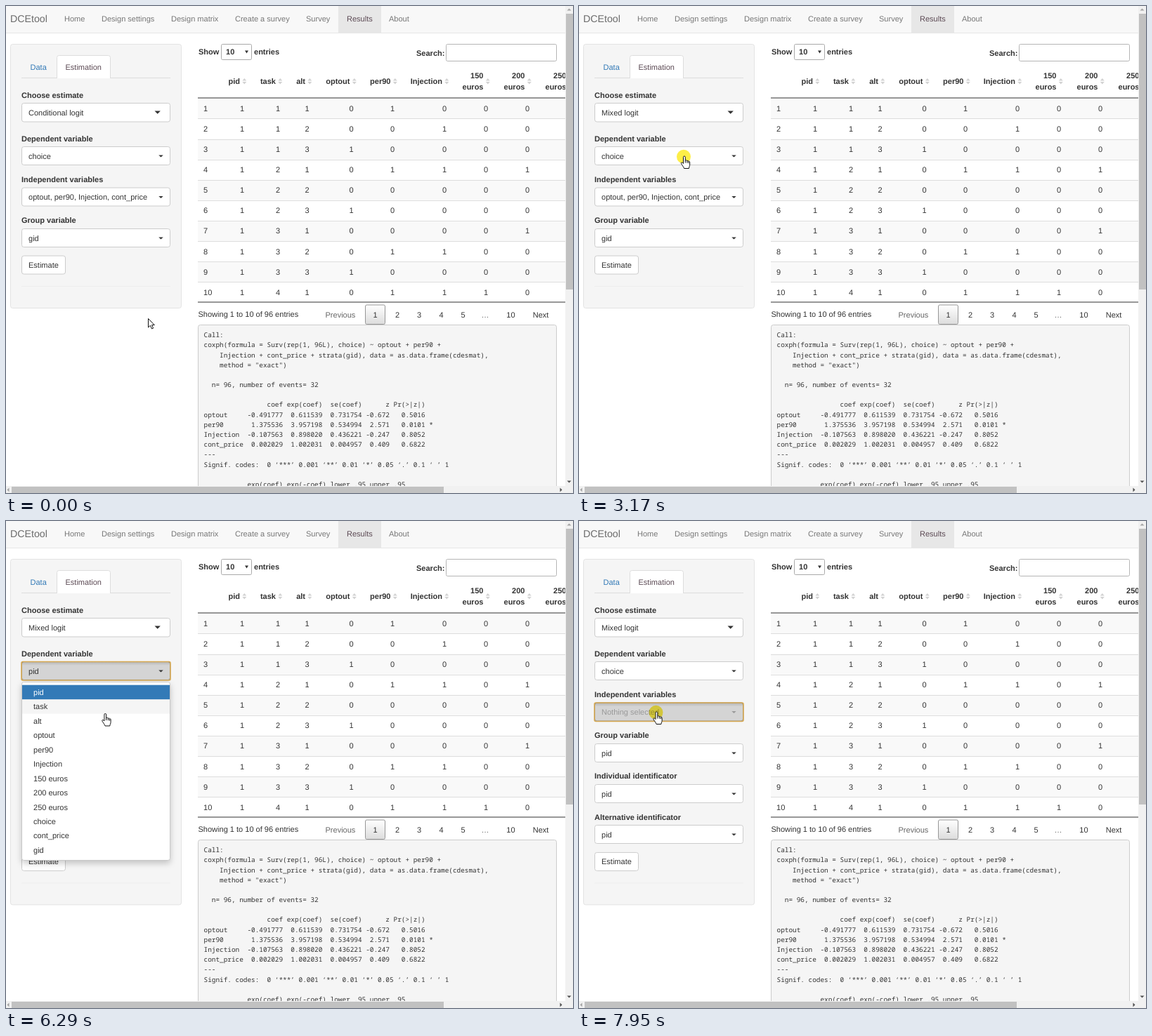
Recreate the animation shown at these times as an HTML page. Size 807 px wide and 694 px high, loop 8000 ms.

```html
<!DOCTYPE html>
<html lang="en">
<head>
<meta charset="utf-8">
<title>Results</title>
<style>
html, body { margin: 0; width: 100%; height: 100%; overflow: hidden; background: #fff; }
svg { display: block; position: absolute; left: 0; top: 0; }
text { font: 11.02px "Liberation Sans", Arial, sans-serif; fill: #333; white-space: pre; text-rendering: geometricPrecision; }
.b { font-weight: bold; }
.brand { font-size: 14.2px; fill: #6c6c6c; }
.nav { fill: #777; }
.on { fill: #5c4a54; }
.link { fill: #337ab7; }
.dim { fill: #999; }
.mid { fill: #666; }
.white { fill: #fff; }
.end { text-anchor: end; }
.num { text-anchor: middle; }
.mono { font: 9.38px "Noto Sans Mono", "DejaVu Sans Mono", monospace; }
.menu { filter: drop-shadow(0 4px 4px rgba(0,0,0,.2)); }
.glow { filter: drop-shadow(0 0 3px rgba(102,175,233,.6)); }
#spot { mix-blend-mode: multiply; }
</style>
</head>
<body>
<svg width="807" height="694" viewBox="0 0 807 694">
  <defs>
    <linearGradient id="page" x2="0" y2="1"><stop stop-color="#fff"/><stop offset="1" stop-color="#dcdcdc"/></linearGradient>
    <linearGradient id="inset" x2="0" y2="1"><stop stop-opacity=".14"/><stop offset="1" stop-opacity="0"/></linearGradient>
    <clipPath id="view"><rect width="796" height="684"/></clipPath>
  </defs>
  <g clip-path="url(#view)"><g id="main"></g><g id="side"></g></g>
  <g id="bars"></g>
  <circle id="spot" r="10" fill="#fdee48"/>
  <g id="pointer">
    <g stroke="#111" stroke-width="1" fill="#fff" stroke-linejoin="round">
      <path id="arrow" d="M.5 .5V13L3.4 10.3 5.5 15 7.6 14.1 5.5 9.6H9.3Z"/>
      <path id="hand" d="M-1.5 1.9a1.4 1.4 0 0 1 2.8 0V7C1.5 5.8 3.9 6 3.9 7.5 4.1 6.5 6 6.8 6 8.2 6.3 7.4 7.7 7.8 7.7 9V12.6C7.7 14.8 6.6 15.6 6.4 18H-.4C-.8 15.9-3.3 13.6-4.6 10.8-5.1 9.3-3.2 8.7-1.5 11ZM1.3 7V10M3.9 7.5V10.2M6 8.2V10.6"/>
      <path id="beam" fill="none" d="M-2.5-2.5H-.6L0-2 .6-2.5H2.5M0-2V9M-2.5 9.5H-.6L0 9 .6 9.5H2.5"/>
    </g>
  </g>
</svg>
<script>
const $ = id => document.getElementById(id);
const text = (x, y, s, cls = '') => `<text x="${x}" y="${y + 3.9}" class="${cls}">${s}</text>`;
const rect = (x, y, w, h, fill, more = '') => `<rect x="${x}" y="${y}" width="${w}" height="${h}" fill="${fill}" ${more}/>`;
const box = (x, y, w, h, fill, stroke, r = 3, more = '') =>
  rect(x + .5, y + .5, w - 1, h - 1, fill, `stroke="${stroke}" rx="${r}" ${more}`);
// Triangle centred on x, y; a negative h points upwards.
const tri = (x, y, w, h, fill = '#333') =>
  `<path fill="${fill}" d="M${x - w / 2} ${y - h / 2}h${w}l${-w / 2} ${h}z"/>`;
const sideTri = (x, y, w, h, fill) => `<path fill="${fill}" d="M${x - w / 2} ${y - h / 2}v${h}l${w} ${-h / 2}z"/>`;

const ROW = 29.1, ITEM = 20.45;
const heads = [['pid', 333], ['task', 384], ['alt', 426], ['optout', 489.5], ['per90', 547.5],
  ['Injection', 621], ['150 euros', 679.5], ['200 euros', 738.5], ['250 euros', 797.5]];
const digitX = [336, 387, 428.5, 491.5, 550, 624, 683, 742];
const rows = ['11101000', '11200100', '11310000', '12101101', '12200000',
  '12310000', '13100001', '13201100', '13310000', '14101110'];
const output = `Call:
coxph(formula = Surv(rep(1, 96L), choice) ~ optout + per90 +
    Injection + cont_price + strata(gid), data = as.data.frame(cdesmat),
    method = "exact")

  n= 96, number of events= 32

                coef exp(coef)  se(coef)      z Pr(>|z|)
optout     -0.491777  0.611539  0.731754 -0.672   0.5016
per90       1.375536  3.957198  0.534994  2.571   0.0101 *
Injection  -0.107563  0.898020  0.436221 -0.247   0.8052
cont_price  0.002029  1.002031  0.004957  0.409   0.6822
---
Signif. codes:  0 ‘***’ 0.001 ‘**’ 0.01 ‘*’ 0.05 ‘.’ 0.1 ‘ ’ 1

           exp(coef) exp(-coef) lower .95 upper .95`;

function navbar() {
  const items = [['Home', 83], ['Design settings', 136], ['Design matrix', 235], ['Create a survey', 326],
    ['Survey', 427], ['Results', 485], ['About', 545]];
  return rect(0, 0, 796, 38, '#f8f8f8') + rect(0, 38, 796, 1, '#e7e7e7') + rect(473, 0, 61, 38, '#e7e7e7') +
    text(6, 18.8, 'DCEtool', 'brand') +
    items.map(([s, x]) => text(x, 18, s, s === 'Results' ? 'on' : 'nav')).join('');
}

function table() {
  let s = text(274, 65, 'Show', 'b') + box(306, 54, 44, 23, '#fff', '#a9a9a9', 2) + text(313, 65.5, '10', 'b') +
    tri(342.5, 65.5, 5, 4) + text(353, 65, 'entries', 'b') +
    text(584, 67, 'Search:', 'b') + box(626, 54, 158, 25, '#fff', '#b5b5b5', 2);
  for (const [name, x] of heads) {
    const words = name.split(' ');
    words.forEach((w, i) => s += text(x, words.length > 1 ? 99.5 + i * 15.7 : 107, w, 'b end'));
    s += tri(x + 6.3, 104.8, 6, -3.6, '#d2d2d2') + tri(x + 6.3, 109.8, 6, 3.6, '#d2d2d2');
  }
  rows.forEach((r, i) => {
    const y = 131.3 + i * ROW, mid = y + 14.6;
    if (i % 2 === 0) s += rect(273, y, 523, ROW, '#f9f9f9');
    if (i) s += rect(273, Math.round(y), 523, 1, '#ddd');
    s += text(281, mid, i + 1);
    [...r].forEach((d, k) => s += text(digitX[k], mid, d, 'num'));
  });
  s += rect(273, 130.5, 523, 1, '#333') + rect(273, 421.5, 523, 1, '#333');
  s += text(273.5, 439.5, 'Showing 1 to 10 of 96 entries') + text(454.5, 440, 'Previous', 'mid') +
    box(511, 425.5, 29, 28.5, 'url(#page)', '#979797', 2);
  [['1', 525.5], ['2', 557], ['3', 588], ['4', 619.5], ['5', 650.5], ['…', 682], ['10', 718.5], ['Next', 761]]
    .forEach(([p, x]) => s += text(x, 440, p, p === '…' ? 'num mid' : 'num'));
  return s;
}

function consoleBox() {
  return box(273, 454, 511, 260, '#f5f5f5', '#ccc') +
    output.split('\n').map((l, i) => text(281.5, 468.4 + i * 14.17, l, 'mono')).join('');
}

function scrollbars() {
  return rect(796, 0, 11, 694, '#f1f1f1') + rect(0, 684, 807, 10, '#f1f1f1') +
    rect(797, 11, 10, 393, '#c1c1c1') + rect(8, 685, 615, 9, '#c1c1c1') +
    tri(801.5, 5, 6, -3, '#a3a3a3') + tri(801.5, 678, 6, 3, '#505050') +
    sideTri(3, 689.5, -3, 6, '#a3a3a3') + sideTri(790, 689.5, 3, 6, '#505050');
}

$('main').innerHTML = navbar() + table() + consoleBox();
$('bars').innerHTML = scrollbars();

const looks = {
  plain: ['#fff', '#ccc'],
  hover: ['#e6e6e6', '#adadad'],
  focus: ['#e6e6e6', '#8c8c8c'],
  press: ['#d4d4d4', '#8c8c8c'],
};
function button(y, label, look, empty) {
  const [fill, edge] = looks[look];
  let s = box(22, y, 212, 27, fill, edge);
  if (look === 'press') s += rect(23, y + 1, 210, 5, 'url(#inset)');
  if (look === 'press' || look === 'focus')
    s += rect(22, y + .5, 212, 26.5, 'none', 'rx="2" stroke="#d6a850" stroke-width="1.6"');
  return s + text(32, y + 14, label, empty ? 'dim' : '') + tri(220.5, y + 14, 6.4, 3.2, empty ? '#999' : '#333');
}

const estimates = ['FALSE', 'Conditional logit', 'Mixed logit', 'Willingness to pay', 'Figures'];
const columns = ['pid', 'task', 'alt', 'optout', 'per90', 'Injection', '150 euros', '200 euros', '250 euros',
  'choice', 'cont_price', 'gid'];
const rowAt = (y, top) => Math.floor((y - top) / ITEM);

function estimateMenu(y) {
  const at = y < 171.8 ? 1 : Math.min(rowAt(y, 171.8), 4);
  return box(22, 167, 212, 111, '#fff', '#d0d0d0', 2, 'class="menu"') +
    rect(23, 171.8 + at * ITEM, 210, ITEM, '#f5f5f5') +
    estimates.map((s, i) => text(32, 182 + i * ITEM, s)).join('');
}

function columnMenu(y) {
  const at = rowAt(y, 233.7);
  return box(22, 229, 212, 255, '#fff', '#c8c8c8', 3, 'class="menu"') +
    (at > 0 ? rect(23, 233.7 + at * ITEM, 210, ITEM, '#f5f5f5') : '') +
    rect(23, 233.7, 210, ITEM, '#337ab7') +
    columns.map((s, i) => text(39, 244 + i * ITEM, s, i ? '' : 'white')).join('');
}

const within = (t, a, b) => t >= a && t < b;
const state = t => ({
  estOpen: within(t, 1610, 3170),
  menuOpen: within(t, 4410, 7150),
  long: t >= 3280,
});

function sidebar(t, p, st) {
  const { estOpen, menuOpen, long } = st;
  const canHover = !estOpen && !menuOpen && !within(t, 3100, 3240);
  const look = y => canHover && within(p.y, y, y + 27) ? 'hover' : 'plain';
  const depLook = within(t, 4290, 7090) ? 'press' : within(t, 7090, 7150) ? 'hover' : within(t, 7150, 7950) ? 'focus' : look(200);
  const shift = long ? 116.4 : 0;

  let s = box(6, 54, 244, 377 + shift, '#f5f5f5', '#e3e3e3') + rect(22, 399 + shift, 212, 1, '#eee') +
    rect(22, 102, 212, 1, '#ddd') +
    '<path d="M72.5 103V73.5a3 3 0 0 1 3-3H145.5a3 3 0 0 1 3 3V103" fill="#fff" stroke="#ddd"/>' +
    text(34.5, 87, 'Data', 'link') + text(84.5, 87, 'Estimation', 'on');

  s += text(22, 127, 'Choose estimate', 'b') +
    box(22, 138, 212, 27.5, '#fff', estOpen ? '#66afe9' : '#ccc', 3, estOpen ? 'class="glow"' : '') +
    text(32, 152, estimates[t < 3170 ? 1 : 2]) + tri(215.7, 151.6, 8.4, estOpen ? -4.2 : 4.2);
  if (estOpen && !within(t, 2100, 2600)) s += rect(111, 146.5, 1, 11, '#333');

  s += text(22, 189, 'Dependent variable', 'b') + button(200, within(t, 3280, 7150) ? 'pid' : 'choice', depLook) +
    text(22, 247, 'Independent variables', 'b') +
    button(258.5, long ? 'Nothing selected' : 'optout, per90, Injection, cont_price', t >= 7950 ? 'press' : look(258.5), long) +
    text(22, 305, 'Group variable', 'b') + button(317, long ? 'pid' : 'gid', look(317));
  if (long) s += text(22, 363.5, 'Individual identificator', 'b') + button(375, 'pid', look(375)) +
    text(22, 422, 'Alternative identificator', 'b') + button(433, 'pid', look(433));
  s += box(22, 355.5 + shift, 63, 27, '#fff', '#ccc') + text(32, 369 + shift, 'Estimate');

  if (estOpen) s += estimateMenu(p.y);
  if (menuOpen) s += columnMenu(p.y);
  return s;
}

// Pointer stops: time, x, y.
const path = [[0, 202, 445], [140, 202, 445], [860, 171, 155], [930, 171, 155], [960, 170, 155], [1920, 170, 155],
  [2720, 149, 213], [2750, 150, 213.5], [5550, 150, 213.5], [5600, 149, 217], [5800, 149, 217],
  [6290, 141.5, 273.8], [6600, 105, 396.5], [6810, 97.5, 427.5], [7190, 97.5, 427.5], [7880, 110.5, 271.5], [8000, 110.5, 271.5]];

function pointerAt(t) {
  const i = Math.max(0, path.findIndex(k => k[0] > t) - 1);
  const a = path[i], b = path[i + 1], d = b[0] - a[0], u = (t - a[0]) / d;
  const still = (m, n) => m[1] === n[1] && m[2] === n[2];
  const slope = (j, c) => {
    const m = path[j - 1], k = path[j], n = path[j + 1];
    return !m || !n || still(m, k) || still(k, n) ? 0 : (n[c] - m[c]) / (n[0] - m[0]);
  };
  const at = c => a[c] + (b[c] - a[c]) * u * u * (3 - 2 * u) +
    d * u * (1 - u) * (slope(i, c) * (1 - u) - slope(i + 1, c) * u);
  return { x: at(1), y: at(2) };
}

function cursorKind(y, st) {
  if (within(y, 138, 166)) return st.estOpen ? 'beam' : 'hand';
  if (st.estOpen && within(y, 166, 278)) return 'hand';
  if (st.menuOpen && within(y, 200, 484)) return 'hand';
  const tops = st.long ? [200, 258.5, 317, 375, 433] : [200, 258.5, 317];
  return tops.some(top => within(y, top, top + 27)) ? 'hand' : 'arrow';
}

const clicks = [[1570, 1660], [3100, 3240], [4290, 4410], [7090, 7150], [7950, 8000]];
const show = (id, on) => $(id).setAttribute('visibility', on ? 'visible' : 'hidden');
let last = '';

function draw(t) {
  const p = pointerAt(t), st = state(t), html = sidebar(t, p, st), kind = cursorKind(p.y, st);
  if (html !== last) $('side').innerHTML = last = html;
  $('pointer').setAttribute('transform', `translate(${p.x.toFixed(1)} ${p.y.toFixed(1)})`);
  for (const id of ['arrow', 'hand', 'beam']) show(id, id === kind);
  $('spot').setAttribute('cx', p.x - 1);
  $('spot').setAttribute('cy', p.y + 1.3);
  show('spot', clicks.some(([a, b]) => within(t, a, b)));
}

const start = performance.now();
function tick() {
  draw((performance.now() - start) % 8000);
  requestAnimationFrame(tick);
}
tick();
</script>
</body>
</html>
```
